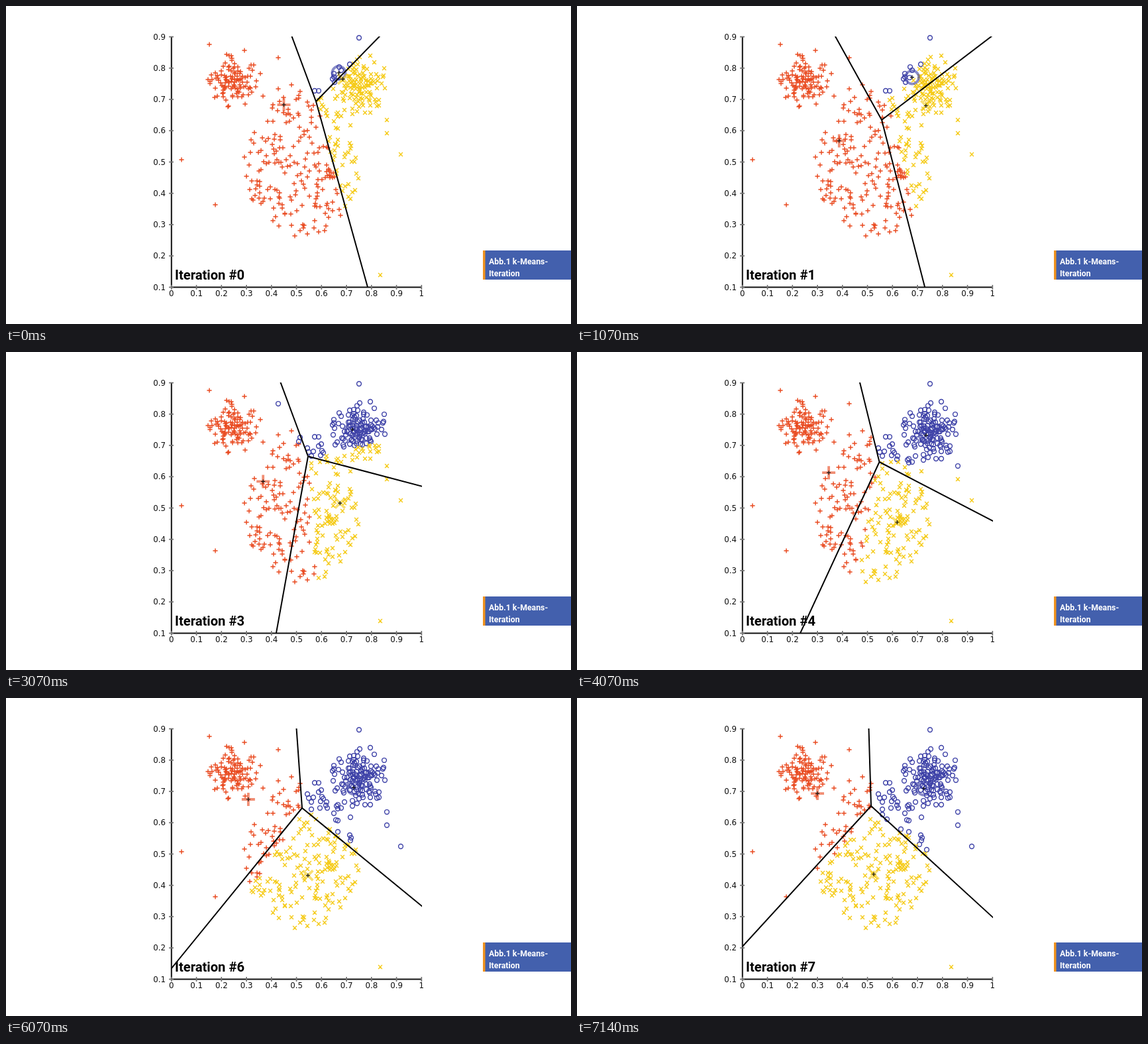
Write an HTML page that moves like this. It is 853x480 px and loops after 8 s.

```html
<!DOCTYPE html>
<html lang="de">
<head>
<meta charset="utf-8">
<title>k-Means-Iteration</title>
<style>
html, body { margin: 0; width: 100%; height: 100%; overflow: hidden; background: #fff; }
svg { display: block; width: 100%; height: 100%; }
path { fill: none; }
.label { font: 11.8px "DejaVu Sans", sans-serif; fill: #111; }
.title { font: bold 20.2px Roboto, sans-serif; }
.caption { font: bold 12.3px Roboto, sans-serif; fill: #fff; }
</style>
</head>
<body>
<svg id="stage" viewBox="0 0 853 480">
  <clipPath id="plot"><rect x="249" y="46" width="379" height="378.5"/></clipPath>
</svg>
<script>
const LOOP = 8000;
const BOX = { left: 249.8, bottom: 424.5, dx: 37.75, dy: 47.25 };
const SQUASH = BOX.dx / BOX.dy; // y pixels to x pixels of equal data length

// The three centres lie on a circle around the point where the borders meet.
// Per step: meeting point, radius, angles of the red, blue and gold centre
const STEPS = [
  [468, 144, 48.7, -184.9, -45, -33.5],
  [460, 172, 69, -201.4, -48.2, -14.4],
  [456, 164, 69, -206.5, -40.5, 16.6],
  [456, 157.5, 74.3, -204.1, -25.8, 49.5],
  [456.5, 166, 77.5, -189.6, -24.6, 69.7],
  [452.5, 168, 80.6, -177.8, -22.5, 81.2],
  [447, 166, 81.8, -172.7, -17.4, 83.8],
  [444, 163, 82.4, -169.4, -14.9, 87.2]
];

// A few points far from the clusters
const STRAYS = [
  [265, 232], [307, 58], [360, 67], [411, 78], [533, 48], [565, 406], [596, 224],
  [575, 192], [575, 172], [316, 300], [333, 73], [384, 102], [374, 89], [550, 75],
  [571, 94], [388, 136], [411, 125], [431, 119], [444, 129], [466, 128], [472, 128],
  [495, 102], [493, 110], [560, 151], [305, 111]
];

let seed = 41;
function rand() {
  seed = (seed + 0x6d2b79f5) | 0;
  let t = Math.imul(seed ^ (seed >>> 15), 1 | seed);
  t = (t + Math.imul(t ^ (t >>> 7), 61 | t)) ^ t;
  return ((t ^ (t >>> 14)) >>> 0) / 4294967296;
}

// Golden-angle spiral with jitter: random, but without holes or clumps
function cluster(n, x, y, rx, ry, radius) {
  return Array.from({ length: n }, (_, i) => {
    const r = radius((i + rand()) / n), a = i * 2.39996 + rand() * 1.2;
    return [x + rx * r * Math.cos(a), y + ry * r * Math.sin(a)].map(Math.round);
  });
}
const gauss = u => Math.min(2.2, Math.sqrt(-2 * Math.log(1 - u)));

const points = [
  ...STRAYS,
  ...cluster(104, 343, 114, 16, 18, gauss),
  ...cluster(120, 533, 121, 18, 20, gauss),
  ...cluster(225, 447, 240, 88, 108, Math.sqrt),
  ...cluster(11, 490, 255, 4, 5, gauss)
];

const plus = (x, y, r) => `M${x - r} ${y}h${2 * r}M${x} ${y - r}v${2 * r}`;
const cross = (x, y, r) => `M${x - r} ${y - r}l${2 * r} ${2 * r}M${x - r} ${y + r}l${2 * r} ${-2 * r}`;
const ring = (x, y, r) => `M${x - r} ${y}a${r} ${r} 0 1 1 ${2 * r} 0a${r} ${r} 0 1 1 ${-2 * r} 0`;
const KINDS = [
  { color: '#e9491f', mark: plus, r: 3.6, big: 10 },
  { color: '#3f43a8', mark: ring, r: 3.4, big: 10 },
  { color: '#f5cb1a', mark: cross, r: 2.9, big: 7.5 }
];

function polar([x, y], r, deg) {
  const a = deg * Math.PI / 180;
  return [x + r * Math.cos(a), y + r * Math.sin(a) / SQUASH];
}

const centersOf = ([x, y, r, ...angles]) => angles.map(a => polar([x, y], r, a));

// Each border halves the angle between two neighbouring centres
function bordersOf([x, y, , red, blue, gold]) {
  return [red + blue, blue + gold, gold + red + 360]
    .map(sum => `M${x} ${y}L${polar([x, y], 600, sum / 2)}`).join('');
}

function nearest([x, y], centers) {
  const dist = centers.map(c => Math.hypot(x - c[0], (y - c[1]) * SQUASH));
  return dist.indexOf(Math.min(...dist));
}

const stage = document.getElementById('stage');
function add(name, attrs, text = '') {
  const el = document.createElementNS('http://www.w3.org/2000/svg', name);
  for (const key in attrs) el.setAttribute(key, attrs[key]);
  el.textContent = text;
  return stage.appendChild(el);
}

const marks = KINDS.map(k => add('path', { stroke: k.color, 'stroke-width': 1.45 }));
const centerMarks = KINDS.map(k => add('path', { stroke: k.color, 'stroke-width': 3.8, 'stroke-opacity': 0.62 }));
const cores = add('path', { stroke: '#111', 'stroke-width': 1.2 });
const borders = add('path', { stroke: '#000', 'stroke-width': 2, 'clip-path': 'url(#plot)' });

function addTick(d, x, y, anchor, value) {
  add('path', { d, stroke: '#777', 'stroke-width': 1.8 });
  add('text', { x, y, class: 'label', 'text-anchor': anchor }, String(value / 10));
}

add('path', { d: `M${BOX.left} 46V${BOX.bottom}H628`, stroke: '#111', 'stroke-width': 2 });
for (let i = 0; i <= 10; i++) {
  const x = BOX.left + i * BOX.dx;
  addTick(`M${x} 421v7`, x, 438, 'middle', i);
}
for (let i = 1; i <= 9; i++) {
  const y = BOX.bottom - (i - 1) * BOX.dy;
  addTick(`M246 ${y}h7`, 241, y + 4.2, 'end', i);
}
const title = add('text', { x: 255, y: 413, class: 'title' });

add('rect', { x: 720, y: 369, width: 133, height: 44, fill: '#4360ad' });
add('rect', { x: 720, y: 369, width: 3.5, height: 44, fill: '#f0931f' });
add('text', { x: 729, y: 390, class: 'caption' }, 'Abb.1 k-Means-');
add('text', { x: 729, y: 408, class: 'caption' }, 'Iteration');

let shown = -1;
function draw(step) {
  if (step === shown) return;
  shown = step;
  const centers = centersOf(STEPS[step]);
  // Points still belong to the centres of the step before
  const owners = centersOf(STEPS[Math.max(0, step - 1)]);
  const paths = ['', '', ''];
  for (const p of points) {
    const i = nearest(p, owners);
    paths[i] += KINDS[i].mark(...p, KINDS[i].r);
  }
  KINDS.forEach((kind, i) => {
    marks[i].setAttribute('d', paths[i]);
    centerMarks[i].setAttribute('d', kind.mark(...centers[i], kind.big));
  });
  cores.setAttribute('d', centers.map(c => plus(...c, 3)).join(''));
  borders.setAttribute('d', bordersOf(STEPS[step]));
  title.textContent = `Iteration #${step}`;
}

// One step per second; the first and the seventh last 70 ms longer
function stepAt(t) {
  const late = t < 7070 ? 70 : 140;
  return Math.max(0, Math.floor((t - late) / 1000));
}

const origin = performance.now();
function tick() {
  draw(stepAt((performance.now() - origin) % LOOP));
  requestAnimationFrame(tick);
}
tick();
</script>
</body>
</html>
```
